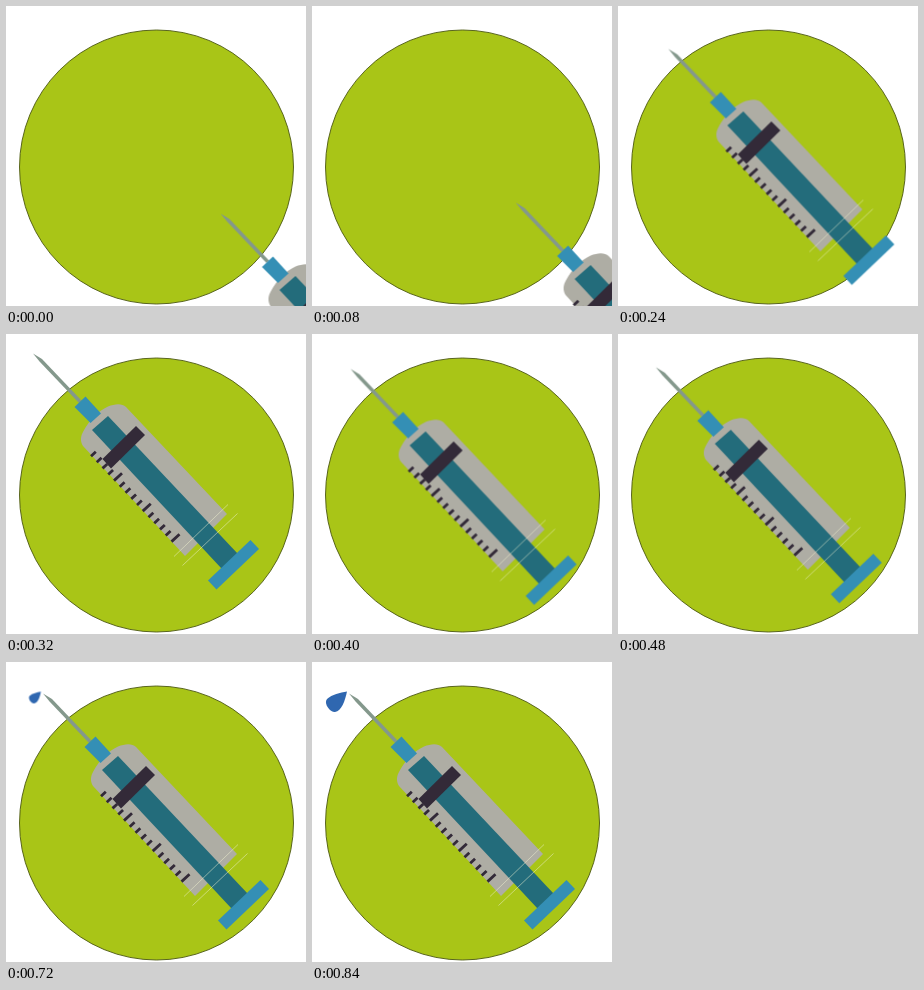
An HTML page for the animation above (1.92 s loop, 300x300 px).

```html
<!DOCTYPE html>
<html lang="en">
<head>
<meta charset="utf-8">
<title>Syringe</title>
<style>
  html, body { margin: 0; width: 100%; height: 100%; overflow: hidden; background: #fff; }
  svg { display: block; width: 100%; height: 100%; }
  #drop { transform-origin: 35px 30px; }
</style>
</head>
<body>
<svg viewBox="0 0 300 300">
  <circle cx="150.5" cy="161" r="137" fill="#a9c517" stroke="#4b5710" stroke-width=".9"/>
  <g id="syringe">
    <path fill="#84988c" d="M37 31.5L46 37L85.5 78.5L83 81L43.5 39.5Z"/>
    <path fill="#aeada4" d="M87 124C84 119 84.5 114 87.5 109C93 99 102 89 112 84.5C119 81.5 126 81 130 85L231 192L189 234Z"/>
    <path fill="#348fb5" d="M78.5 85L89.5 74.5L105 91.5L94.5 101Z"/>
    <path fill="#236c7b" d="M96 108L112 94L242 232L226 247Z"/>
    <path fill="#348fb5" d="M254.5 218L263 227L220.5 267.5L212 258.5Z"/>
    <path id="ticks" stroke="#332a38" stroke-width="2.8"/>
    <path fill="#332a38" d="M106.5 137L140 104L149 113L115 146.500Z"/>
    <path fill="none" stroke="#eef0cf" stroke-opacity=".65" stroke-width=".8" d="M178 234.500L232 182.500M186.500 243.500L241.500 191.500"/>
  </g>
  <path id="drop" fill="#2f67b0" d="M35 29.500C28 30.500 20 32.500 15 37C11.500 41 17.500 50.500 23 50C29.500 49 33 39 35 29.500Z"/>
</svg>
<script>
const LOOP = 1920, STEP = 40;
const byId = id => document.getElementById(id);

// Scale marks: every fifth one is long
let marks = '';
for (let i = 0; i < 15; i++) {
  const size = i % 5 === 4 ? 8 : 4.8;
  marks += `M${95 + i * 5.75} ${134.2 + i * 6.1}l${size} ${-size * 0.93}`;
}
byId('ticks').setAttribute('d', marks);

const timeline = (id, steps) => {
  const frames = steps.map(([time, transform, easing = 'linear']) =>
    ({ offset: time / LOOP, transform, easing }));
  const anim = byId(id).animate(frames, { duration: LOOP, fill: 'both' });
  anim.pause();
  return anim;
};
const move = (x, y) => `translate(${x}px, ${y}px)`;

const anims = [
  timeline('syringe', [
    [0, move(177.5, 176)],
    [40, move(177.5, 176), 'cubic-bezier(.35, 0, .5, 1)'],
    [320, move(-10, -12), 'ease-in-out'],
    [400, move(1.6, 3.4), 'ease-in-out'],
    [560, move(0, 0)],
    [LOOP, move(0, 0)]
  ]),
  timeline('drop', [
    [0, 'scale(0)'],
    [560, 'scale(0)'],
    [840, 'scale(1)'],
    [LOOP, 'scale(1)']
  ])
];

// The picture advances in 40 ms steps
function draw() {
  const time = Math.floor(performance.now() % LOOP / STEP) * STEP;
  for (const anim of anims) anim.currentTime = time;
  requestAnimationFrame(draw);
}
draw();
</script>
</body>
</html>
```
